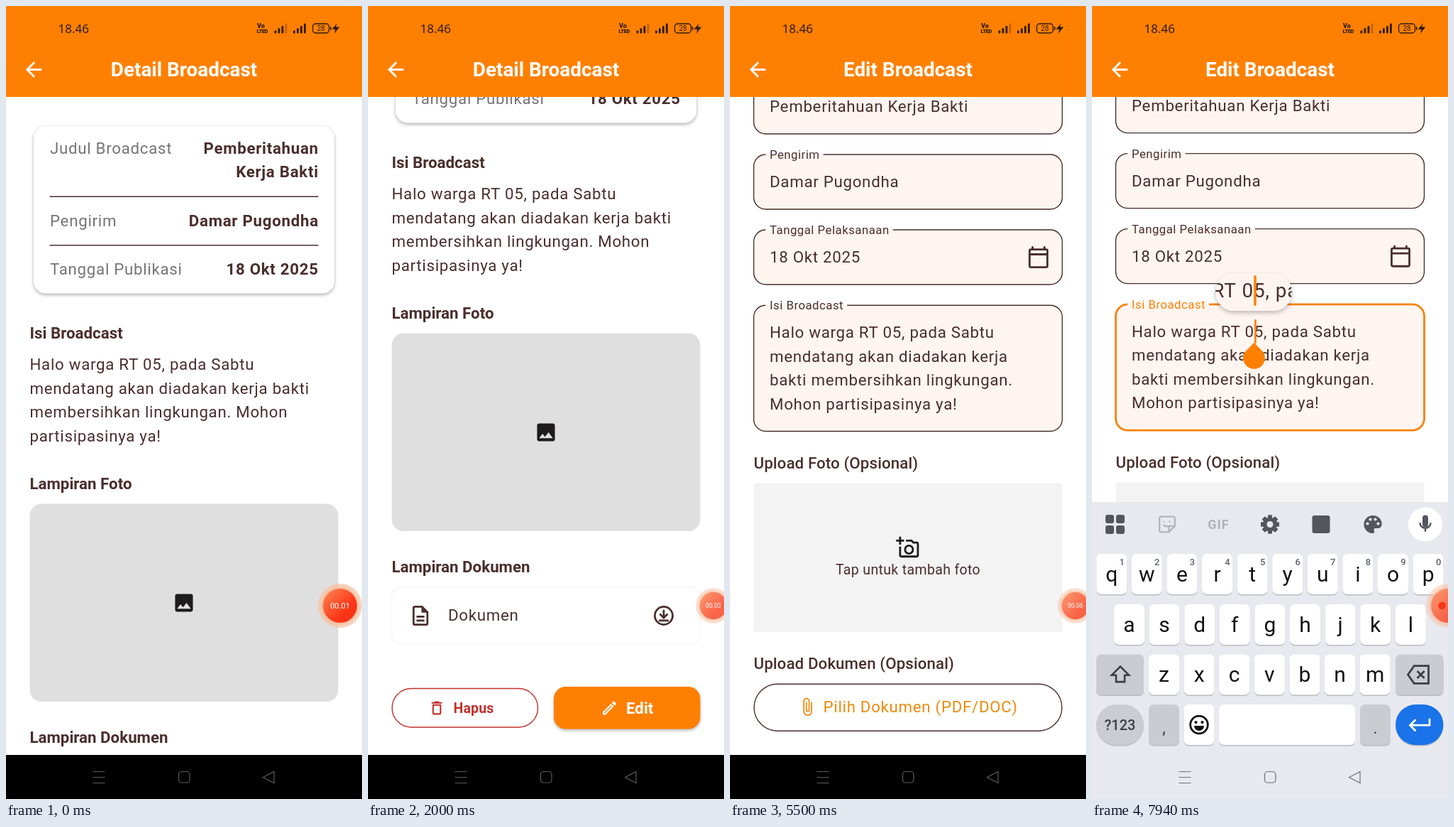
These frames come from a looping animation (502 by 1116 pixels, 8 s). An HTML page with a canvas:

```html
<!DOCTYPE html>
<html lang="id">
<head>
<meta charset="utf-8">
<title>Broadcast</title>
<style>
html, body { margin: 0; width: 100%; height: 100%; overflow: hidden; background: #fff; }
canvas { display: block; width: 100vw; height: 100vh; }
</style>
</head>
<body>
<canvas id="stage" width="502" height="1116"></canvas>
<script>
const ctx = document.getElementById('stage').getContext('2d');
const W = 502, H = 1116, LOOP = 8000, STEP = 62.5;
const DP = 1.394;
const BODY = 16 * DP, LINE = 24 * DP;
const LEFT = 33.5, RIGHT = 468.5, RADIUS = 16.7;
const ORANGE = '#ff8000', BROWN = '#4a2e2c', RED = '#c4302b', FILL = '#fff5f0';
const SENDER = 'Damar Pugondha';
const NOTE_WIDE = ['Halo warga RT 05, pada Sabtu', 'mendatang akan diadakan kerja bakti',
  'membersihkan lingkungan. Mohon', 'partisipasinya ya!'];
const NOTE_FIELD = ['Halo warga RT 05, pada Sabtu', 'mendatang akan diadakan kerja',
  'bakti membersihkan lingkungan.', 'Mohon partisipasinya ya!'];

// Shapes on a 24-unit grid
const ICON = {
  back: 'M20 11H7.83l5.59-5.59L12 4l-8 8 8 8 1.41-1.41L7.83 13H20z',
  image: 'M21 19V5c0-1.1-.9-2-2-2H5c-1.1 0-2 .9-2 2v14c0 1.1.9 2 2 2h14c1.1 0 2-.9 2-2zM8.5 13.5l2.5 3L14.5 12l4.5 6H5z',
  doc: 'M8 16h8v2H8zM8 12h8v2H8zM14 2H6C4.9 2 4 2.9 4 4v16c0 1.1.9 2 2 2h12c1.1 0 2-.9 2-2V8zM18 20H6V4h7v5h5z',
  trash: 'M6 19c0 1.1.9 2 2 2h8c1.1 0 2-.9 2-2V7H6zM8 9h8v10H8zM15.5 4l-1-1h-5l-1 1H5v2h14V4z',
  pen: 'M14.06 9.02l.92.92L5.92 19H5v-.92zM17.66 3c-.25 0-.51.1-.7.29l-1.83 1.83 3.75 3.75 1.83-1.83c.39-.39.39-1.02 0-1.41l-2.34-2.34c-.2-.2-.45-.29-.71-.29zM14.06 6.19L3 17.25V21h3.75L17.81 9.94z',
  calendar: 'M20 3h-1V1h-2v2H7V1H5v2H4c-1.1 0-2 .9-2 2v16c0 1.1.9 2 2 2h16c1.1 0 2-.9 2-2V5c0-1.1-.9-2-2-2zM20 5v3H4V5zM4 21V10h16v11z',
  camera: 'M21 6h-3.17L16 4h-6v2h5.12l1.83 2H21v12H5v-9H3v9c0 1.1.9 2 2 2h16c1.1 0 2-.9 2-2V8c0-1.1-.9-2-2-2zM8 14a5 5 0 1 0 10 0a5 5 0 1 0-10 0zM10 14a3 3 0 1 0 6 0a3 3 0 1 0-6 0zM5 6h3V4H5V1H3v3H0v2h3v3h2z',
  download: 'M3 12a9 9 0 1 0 18 0a9 9 0 1 0-18 0M12 6v8M8 10.2l4 4 4-4M7 17h10',
  clip: 'M17.2 6v11.5a4.7 4.7 0 0 1-9.4 0V5a3.2 3.2 0 0 1 6.4 0v10.5a1.7 1.7 0 0 1-3.4 0V6',
  bolt: 'M15 1L4 14h7L9 23 20 9h-8z',
  shift: 'M12 3.5L3 12.5h4.5v7h9v-7H21z',
  erase: 'M22 3.5H8L2 12l6 8.5h14zM11 8.5l7 7M18 8.5l-7 7',
  enter: 'M22 6v6.5H3M8.500 7L3 12.500 8.500 18',
  sticker: 'M14 21H5a2 2 0 0 1-2-2V5a2 2 0 0 1 2-2h14a2 2 0 0 1 2 2v9zM14 21v-7h7M8 8v1.500M15 8v1.500M7.500 12.500q3 3.500 5.500 1',
  mic: 'M6 11a6 6 0 0 0 12 0M12 17v4',
  palette: 'M12 3a9 9 0 1 0 0 18c1.500 0 2-1.500 1.300-2.600-.6-1.200 0-2.400 1.400-2.400H17a4 4 0 0 0 4-4.500C21 6.500 17 3 12 3z'
};
for (const k in ICON) ICON[k] = new Path2D(ICON[k]);

const clamp = v => Math.max(0, Math.min(1, v));
const progress = (t, a, b) => clamp((t - a) / (b - a));
const easeOut = (p, n) => 1 - Math.pow(1 - p, n);
const mix = (a, b, p) => a + (b - a) * p;
const mixRgb = (a, b, p) => `rgb(${a.map((v, i) => Math.round(mix(v, b[i], p)))})`;

function text(s, x, y, o = {}) {
  const size = o.size || BODY;
  ctx.font = `${o.weight || 400} ${size}px ${o.font || 'Roboto'}, sans-serif`;
  ctx.letterSpacing = (o.ls ?? 0.7) + 'px';
  ctx.textAlign = o.align || 'left';
  ctx.fillStyle = o.color || BROWN;
  ctx.fillText(s, x, y + size * 0.355);
  return ctx.measureText(s).width;
}
const heading = (s, y) => text(s, LEFT, y, { weight: 700, ls: 0 });
const lines = (list, x, y) => list.forEach((s, i) => text(s, x, y + i * LINE));

function icon(name, x, y, scale, color, stroke) {
  ctx.save();
  ctx.translate(x - 12 * scale, y - 12 * scale);
  ctx.scale(scale, scale);
  if (stroke) {
    ctx.lineWidth = stroke;
    ctx.strokeStyle = color;
    ctx.stroke(ICON[name]);
  } else {
    ctx.fillStyle = color;
    ctx.fill(ICON[name], 'evenodd');
  }
  ctx.restore();
}

function rect(x, y, w, h, r, fill, stroke, lw = 1.4) {
  ctx.beginPath();
  ctx.roundRect(x, y, w, h, r);
  if (fill) { ctx.fillStyle = fill; ctx.fill(); }
  if (stroke) { ctx.strokeStyle = stroke; ctx.lineWidth = lw; ctx.stroke(); }
}

function raised(blur, dy, alpha, draw) {
  ctx.save();
  ctx.shadowColor = `rgba(0,0,0,${alpha})`;
  ctx.shadowBlur = blur;
  ctx.shadowOffsetY = dy;
  draw();
  ctx.restore();
}

function disc(x, y, r, fill) {
  ctx.beginPath();
  ctx.arc(x, y, r, 0, 7);
  ctx.fillStyle = fill;
  ctx.fill();
}

function appBar(title) {
  rect(0, 0, W, 128, 0, ORANGE);
  icon('back', 39, 89.5, DP, '#fff');
  text(title, 251, 89.5, { size: 20 * DP, weight: 700, color: '#fff', align: 'center', ls: 0 });
}

function detailPage(scroll) {
  rect(0, 0, W, H, 0, '#fff');
  ctx.save();
  ctx.translate(0, -scroll);
  raised(5, 2, 0.32, () => rect(39, 169, 424, 235.5, RADIUS, '#fff'));
  const row = (label, value, y) => {
    if (label) text(label, 62, y, { color: '#757575' });
    text(value, 440.8, y, { weight: 700, align: 'right' });
  };
  row('Judul Broadcast', 'Pemberitahuan', 200);
  row('', 'Kerja Bakti', 233.5);
  row('Pengirim', SENDER, 302);
  row('Tanggal Publikasi', '18 Okt 2025', 370.5);
  rect(61.5, 267.5, 379, 1.4, 0, BROWN);
  rect(61.5, 336, 379, 1.4, 0, BROWN);

  heading('Isi Broadcast', 460);
  lines(NOTE_WIDE, LEFT, 504.5);
  heading('Lampiran Foto', 672);
  rect(LEFT, 700.5, RIGHT - LEFT, 278.5, RADIUS, '#dfdfdf');
  icon('image', 251, 840, DP, '#1d1b1b');

  heading('Lampiran Dokumen', 1029);
  rect(LEFT, 1058, RIGHT - LEFT, 79.5, 12, '#fff', '#f5f5f5');
  icon('doc', 74, 1098, DP, BROWN);
  text('Dokumen', 113, 1097.5);
  icon('download', 417, 1098, DP, BROWN, 2);

  rect(34, 1200.5, 205.5, 54.5, 27, '#fff', RED);
  icon('trash', 97, 1228, 1.046, RED);
  text('Hapus', 120.5, 1228, { size: 14 * DP, weight: 700, color: RED, ls: 0.14 });
  raised(4, 2, 0.3, () => rect(262, 1198, 206.5, 59.5, RADIUS, ORANGE));
  icon('pen', 340.5, 1228, 1.046, '#fff');
  text('Edit', 364, 1228, { weight: 700, color: '#fff', ls: 0 });
  ctx.restore();
  appBar('Detail Broadcast');
}

function field(label, y, h, focus = 0) {
  const color = focus ? mixRgb([74, 46, 44], [248, 130, 10], focus) : BROWN;
  const r = RADIUS, b = y + h;
  rect(LEFT, y, RIGHT - LEFT, h, r, FILL);
  const width = text(label, 56, y, { size: 12 * DP, ls: 0.52, color });
  ctx.beginPath();
  ctx.moveTo(56 + width + 5, y);
  ctx.arcTo(RIGHT, y, RIGHT, b, r);
  ctx.arcTo(RIGHT, b, LEFT, b, r);
  ctx.arcTo(LEFT, b, LEFT, y, r);
  ctx.arcTo(LEFT, y, RIGHT, y, r);
  ctx.lineWidth = mix(1.4, 2.8, focus);
  ctx.strokeStyle = color;
  ctx.stroke();
}

function editPage(scroll, focus, cursor) {
  rect(0, 0, W, H, 0, '#fff');
  ctx.save();
  ctx.translate(0, -scroll);
  field('Judul Broadcast', 162.3, 77);
  text('Pemberitahuan Kerja Bakti', 56, 200.5);
  field('Pengirim', 268.3, 77);
  text(SENDER, 56, 306.5);
  field('Tanggal Pelaksanaan', 374.3, 77);
  text('18 Okt 2025', 56, 412.5);
  icon('calendar', 435, 413, DP, BROWN);
  field('Isi Broadcast', 480.5, 177.3, focus);
  lines(NOTE_FIELD, 56, 518.7);
  if (cursor) rect(229, 501.7, 2.8, 34, 1, ORANGE);

  const title = { weight: 500, ls: 0.1 };
  text('Upload Foto (Opsional)', LEFT, 702.7, title);
  rect(LEFT, 731, RIGHT - LEFT, 209, 0, '#f3f3f3');
  icon('camera', 251, 821.5, DP, '#1d1b1b');
  text('Tap untuk tambah foto', 251, 852.8, { size: 14 * DP, ls: 0.35, align: 'center' });
  text('Upload Dokumen (Opsional)', LEFT, 984.3, title);
  rect(34, 1013.5, 434, 66, 33, '#fff', BROWN);
  icon('clip', 109, 1045.7, 1.16, '#ee8a0c', 1.5);
  text('Pilih Dokumen (PDF/DOC)', 131.5, 1045.7, { color: '#ee8a0c' });
  ctx.restore();
  appBar('Edit Broadcast');
}

function caretHandle() {
  const x = 228.5, y = 495.5, r = 15.3;
  ctx.beginPath();
  ctx.arc(x, y, r, -Math.PI / 4, Math.PI * 1.25);
  ctx.lineTo(x, y - r * Math.SQRT2);
  ctx.closePath();
  ctx.fillStyle = ORANGE;
  ctx.fill();
}

function magnifier(scroll) {
  const x = 174, y = 376, w = 108, h = 53;
  raised(6, 3, 0.25, () => rect(x, y, w, h, h / 2, FILL));
  ctx.save();
  ctx.beginPath();
  ctx.roundRect(x, y, w, h, h / 2);
  ctx.clip();
  ctx.translate(x + w / 2, y + h / 2);
  ctx.scale(1.25, 1.25);
  ctx.translate(-228.8, -459.6);
  editPage(scroll, 1, true);
  ctx.restore();
}

function statusBar() {
  const ink = '#2e1a08';
  text('18.46', 73.5, 31.5, { size: 17, font: 'Noto Sans', color: ink, ls: 0 });
  text('Vo', 354, 27.500, { size: 9, weight: 900, color: ink, ls: 0 });
  text('LTED', 353.500, 35, { size: 7.500, weight: 900, color: ink, ls: -0.4 });
  [378.500, 405].forEach((x, n) => {
    for (let i = 0; i < 4; i++) {
      const h = 4 + i * 3.300;
      const dim = n === 0 && i === 3;
      rect(x + i * 5, 38.500 - h, 2.800, h, 1, dim ? 'rgba(46,26,8,.3)' : ink);
    }
  });
  rect(432.500, 25, 23, 13, 4, null, ink, 1.4);
  rect(457, 29, 1.6, 5, 0.8, ink);
  text('28', 444, 31.700, { size: 10, color: ink, align: 'center', ls: 0 });
  icon('bolt', 465, 31.500, 0.66, ink);
}

function navIcons(color) {
  ctx.strokeStyle = color;
  ctx.lineWidth = 1.2;
  ctx.beginPath();
  for (const y of [1077.5, 1085.5, 1093.5]) { ctx.moveTo(122.5, y); ctx.lineTo(139.5, y); }
  ctx.moveTo(362.5, 1085.5);
  ctx.lineTo(378, 1077.5);
  ctx.lineTo(378, 1093.5);
  ctx.closePath();
  ctx.stroke();
  rect(243.5, 1077.5, 15.5, 15.5, 4, null, color, 1.2);
}

function recorder(t) {
  const dock = progress(t, 875, 1125), hide = progress(t, 5937.5, 6250);
  const x = mix(mix(471, 487, dock), 502, hide), y = 844;
  const scale = mix(mix(1, 0.8, dock), 1, hide);
  const r = 24 * scale;
  ctx.save();
  ctx.globalAlpha = mix(1, 0.7, dock);
  disc(x, y, 31 * scale, 'rgba(246,196,166,.75)');
  disc(x, y, 27 * scale, 'rgba(244,180,146,.5)');
  const g = ctx.createLinearGradient(x - r, y - r, x + r, y + r);
  g.addColorStop(0.1, '#ff7a4c');
  g.addColorStop(0.65, '#fb3718');
  g.addColorStop(1, '#f5300f');
  disc(x, y, r, g);
  ctx.restore();
  if (hide < 0.5) {
    const clock = '00.0' + (1 + Math.floor(t / 1000));
    text(clock, x, y, { size: 11 * scale, color: '#fff', align: 'center', ls: 0 });
  } else {
    disc(493.5, y, 5.3, '#f03a1a');
  }
}

function key(x, y, w, fill = '#fff', r = 7) {
  rect(x, y + 1.5, w, 57, r, '#b9bbc2');
  rect(x, y, w, 57, r, fill);
}

function toolbar(y) {
  const dark = '#54565c', pale = '#b1b3b9', bg = '#e8e9ef';
  for (const dx of [0, 15]) for (const dy of [0, 15]) rect(19 + dx, y - 13.5 + dy, 12, 12, 3, dark);
  icon('sticker', 106, y, 1.2, pale, 1.9);
  text('GIF', 178.5, y, { size: 18, weight: 700, color: pale, align: 'center', ls: 1 });
  ctx.save();
  ctx.translate(251, y);
  for (let i = 0; i < 8; i++) {
    rect(-3, -13, 6, 26, 1, dark);
    ctx.rotate(Math.PI / 4);
  }
  disc(0, 0, 10, dark);
  disc(0, 0, 4.5, bg);
  ctx.restore();
  rect(310.5, y - 12.500, 25, 25, 3, dark);
  icon('palette', 396, y, 1.4, dark);
  for (const [dx, dy] of [[-7.5, -1], [-3.5, -7], [3.5, -7], [7.5, -1]]) disc(396 + dx, y + dy, 2.1, bg);
  disc(470, y, 24, '#fff');
  rect(466, y - 13, 8, 17, 4, dark);
  icon('mic', 470, y - 1, 1.25, dark, 2);
}

function keyboard(off, nav) {
  const grey = '#cbccd2', ink = '#111', dark = '#3c3e43', pitch = 49.6, kw = 43;
  ctx.save();
  ctx.translate(0, off);
  rect(0, 698, W, H, 0, '#e8e9ef');
  toolbar(729.5);
  const row = (letters, cx, y) => [...letters].forEach((c, i) => {
    const x = cx + i * pitch;
    key(x - kw / 2, y, kw);
    text(c, x, y + 28, { size: 30, color: ink, align: 'center', ls: 0 });
    if (y < 800) {
      text('' + (i + 1) % 10, x + 14.5, 782, { size: 13, weight: 500, color: '#5f6167', align: 'center', ls: 0 });
    }
  });
  row('qwertyuiop', 27.7, 771);
  row('asdfghjkl', 52.5, 842);
  row('zxcvbnm', 101.5, 912.5);
  key(6, 912.5, 67, grey);
  icon('shift', 40, 941, 1.35, dark, 1.9);
  key(428, 912.5, 67.5, grey);
  icon('erase', 460, 941, 1.45, dark, 1.9);

  key(6, 983, 67, grey, 28.5);
  text('?123', 39.5, 1012, { size: 20, weight: 500, color: dark, align: 'center', ls: 0 });
  key(80, 983, kw, grey);
  text(',', 101.5, 1016, { size: 23, color: dark, align: 'center', ls: 0 });
  key(129.500, 983, kw);
  ctx.lineWidth = 2.800;
  ctx.strokeStyle = ink;
  ctx.beginPath();
  ctx.arc(151, 1011.500, 12.300, 0, 7);
  ctx.stroke();
  disc(146.500, 1008, 2.100, ink);
  disc(155.500, 1008, 2.100, ink);
  ctx.beginPath();
  ctx.arc(151, 1013, 7, 0, Math.PI);
  ctx.fill();
  key(179, 983, 192);
  key(378, 983, 42.500, grey);
  text('.', 399.500, 1016, { size: 23, color: dark, align: 'center', ls: 0 });
  key(428, 983, 67.500, '#1a73e8', 28.5);
  icon('enter', 461.500, 1011.500, 1.450, '#fff', 1.9);
  ctx.restore();
  if (nav > 0) navIcons(`rgba(110,112,118,${nav})`);
}

function draw(t) {
  ctx.clearRect(0, 0, W, H);
  const editing = t >= 3562.5;
  const focus = progress(t, 6437.5, 6625);
  if (!editing) {
    ctx.save();
    if (t >= 3375) {
      ctx.translate(W / 2, H / 2);
      ctx.scale(1.003, 1.003);
      ctx.translate(-W / 2, -H / 2);
    }
    detailPage(240 * easeOut(progress(t, 375, 625), 2));
    ctx.restore();
  } else {
    const scroll = 59.3 * easeOut(progress(t, 5250, 5500), 2) + (t >= 6812.5 ? 1.4 : 0);
    const cursor = focus > 0 && (t < 6875 || t >= 7375);
    editPage(scroll, focus, cursor);
    if (focus === 1) caretHandle();
    if (t >= 7812.5) magnifier(scroll);
  }
  statusBar();
  rect(0, 1054, W, 62, 0, '#000');
  navIcons('#5c5c5c');
  const rise = progress(t, 6750, 7074);
  if (rise > 0) keyboard(418 * Math.pow(1 - rise, 3), progress(t, 6990, 7187.5));
  recorder(t);
}

// The screen refreshes sixteen times a second.
function tick(now) {
  const t = now % LOOP;
  draw(Math.min(Math.floor((t + 5) / STEP) * STEP, LOOP - STEP));
  requestAnimationFrame(tick);
}
draw(0);
requestAnimationFrame(tick);
</script>
</body>
</html>
```
